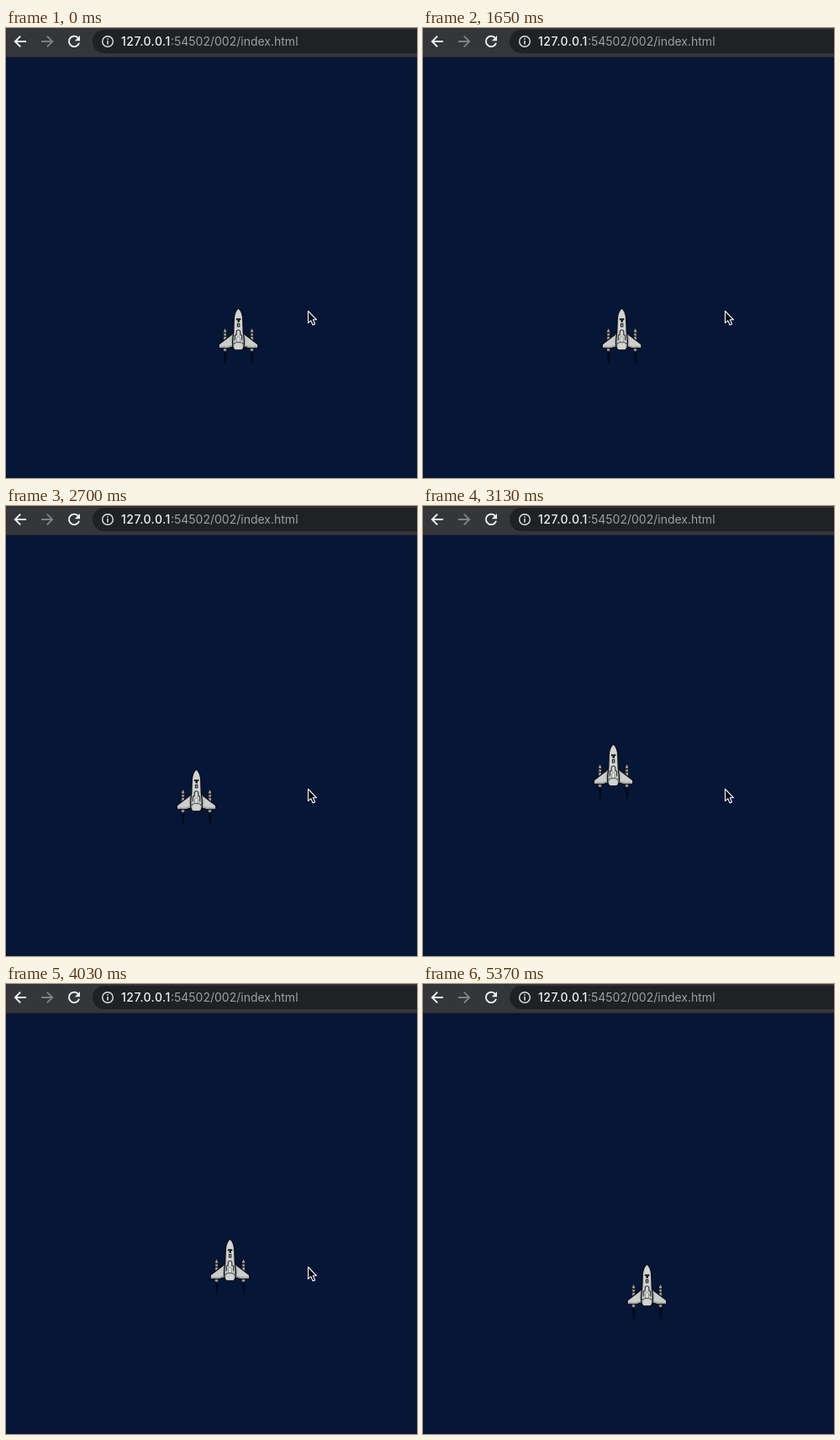
These frames come from a looping animation (489 by 535 pixels, 5.67 s). An HTML page:

```html
<!DOCTYPE html>
<html lang="en">
<head>
<meta charset="utf-8">
<title>Ship</title>
<style>
  html, body { margin: 0; width: 100%; height: 100%; overflow: hidden; background: #051637; }
  svg { display: block; width: 489px; height: 535px; }
  text { font: 14px Inter, Roboto, sans-serif; white-space: pre; }
  .host { font-weight: 500; letter-spacing: .48px; }
</style>
</head>
<body>
<svg viewBox="0 0 489 535" xmlns="http://www.w3.org/2000/svg">
  <defs>
    <linearGradient id="hull">
      <stop offset="0" stop-color="#a9abaa"/>
      <stop offset=".25" stop-color="#d2d4d2"/>
      <stop offset=".75" stop-color="#d2d4d2"/>
      <stop offset="1" stop-color="#a9abaa"/>
    </linearGradient>
    <g id="booster">
      <path d="M8.6 24.5 L10.4 28 V48 L10.8 50.5 L9.8 52.4 H7.4 L6.2 50.5 L6.8 48 V28 Z" fill="#a3a49f" stroke="#0d1014" stroke-width=".9"/>
      <path d="M6.6 30.5 H10.6 M6.6 34.4 H10.6" stroke="#15161a" stroke-width="1.4"/>
      <path d="M7.2 28.4 H10" stroke="#b49a83" stroke-width="1"/>
      <path d="M6.9 54 H10.4 L10 61 L9.2 67.5 L8.2 66 L7.8 60 Z" fill="#020814"/>
    </g>
    <g id="wing">
      <path d="M19.4 27 L16.6 32.4 L1.7 43.8 Q.4 46.8 1.8 48.6 L12 48.8 L19 46.6 Z" fill="#cccecc" stroke="#0b0e13" stroke-width="1.3" stroke-linejoin="round"/>
      <path d="M2.8 47 L11.8 47.2 L17.5 45" fill="none" stroke="#8a8d8d" stroke-width="1"/>
      <path d="M17.6 33 L15.8 39.5 L16.8 44.4" fill="none" stroke="#999c9c" stroke-width=".9"/>
    </g>
  </defs>

  <rect width="489" height="535" fill="#051637"/>

  <rect width="489" height="35" fill="#24262d"/>
  <rect width="489" height="34" fill="#35363a"/>
  <rect x="103" y="2" width="420" height="28" rx="14" fill="#202124"/>
  <g fill="none" stroke="#f1f3f4" stroke-width="1.9">
    <path d="M24 16 H11.5 M17.2 9.6 L10.8 16 L17.2 22.4"/>
    <path d="M42 16 H54.5 M48.8 9.6 L55.2 16 L48.8 22.4" stroke="#808185"/>
    <path d="M85.6 11.6 A6.2 6.2 0 1 0 87 17.8"/>
    <path d="M88 9 V15.2 H81.8 Z" fill="#f1f3f4" stroke="none"/>
    <circle cx="121" cy="16" r="6.3" stroke="#e4e5e8" stroke-width="1.4"/>
    <path d="M121 15 V19.4 M121 12.2 V13.8" stroke="#e4e5e8" stroke-width="1.5"/>
  </g>
  <text x="137" y="21" fill="#9aa0a6"><tspan class="host" fill="#f1f3f4">127.0.0.1</tspan>:54502/002/index.html</text>

  <g id="ship">
    <use href="#booster"/>
    <use href="#booster" x="32"/>
    <use href="#wing"/>
    <use href="#wing" transform="matrix(-1 0 0 1 49 0)"/>
    <path d="M24.5 1 C21.6 3.4 19.4 8.5 19.2 15 L18.8 28 L17.6 40 L17.8 46 Q18.4 51 22 51 H27 Q30.6 51 31.2 46 L31.4 40 L30.2 28 L29.8 15 C29.6 8.5 27.4 3.4 24.5 1 Z" fill="url(#hull)" stroke="#0b0e13" stroke-width="1.3"/>
    <path d="M21.8 13.2 H27.4 V15.2 H26 V17.8 H23.4 V15.2 H21.8 Z" fill="#191b1e"/>
    <rect x="23.4" y="19.6" width="2.4" height="3.4" fill="#b9bbba" stroke="#222427" stroke-width="1.1"/>
    <path d="M20.4 39.5 V33 H22.2 V29.4 Q22.4 27 24.5 27 Q26.6 27 26.8 29.4 V33 H28.6 V39.5" fill="none" stroke="#35383a" stroke-width="1.2"/>
    <path d="M22.8 41.6 L22.4 36.4 Q24.5 33 26.6 36.4 L26.2 41.6" fill="#dcdedc" stroke="#777a7a" stroke-width=".8"/>
    <path d="M19 44 Q19.8 41.6 22.6 41.8 H26.4 Q29.2 41.6 30 44" fill="none" stroke="#44474a" stroke-width="1.1"/>
  </g>

  <path id="cursor" d="M0 0 V14.2 L3.2 11.3 L5.6 16.6 L8.1 15.5 L5.8 10.3 H10 Z" fill="#05070c" stroke="#fff" stroke-width="1.1" stroke-linejoin="round"/>
</svg>
<script>
  const LOOP = 5670;
  const STEP = 10;
  const ship = document.getElementById('ship');
  const cursor = document.getElementById('cursor');

  // Each run: step direction, then the times of the key repeats.
  const runs = [
    { dx: -1, dy: 0, times: [300, 750, 1200, 1650, 2100] },
    { dx: 0, dy: -1, times: [2400, 2700, 2840, 2980, 3130] },
    { dx: 1, dy: 0, times: [3280, 3430, 3580, 3880] },
    { dx: 0, dy: 1, times: [3880, 4030, 4180, 4320, 4470] }
  ];

  // Pointer stops: time, x, y.
  const stops = [[0, 359.5, 336.5], [4920, 391.5, 371.5], [5070, 455.5, 472.5], [5220, 457.5, 514.5]];
  const POINTER_GONE = 5370;

  function place(el, x, y) {
    el.setAttribute('transform', `translate(${x} ${y})`);
  }

  function draw(t) {
    let x = 252, y = 332;
    for (const { dx, dy, times } of runs) {
      const count = times.filter(at => at <= t).length;
      x += dx * STEP * count;
      y += dy * STEP * count;
    }
    place(ship, x, y);

    const [, cx, cy] = stops.filter(([at]) => at <= t).pop();
    place(cursor, cx, cy);
    cursor.setAttribute('visibility', t < POINTER_GONE ? 'visible' : 'hidden');
  }

  const start = performance.now();
  function tick() {
    draw((performance.now() - start) % LOOP);
    requestAnimationFrame(tick);
  }
  draw(0);
  requestAnimationFrame(tick);
</script>
</body>
</html>
```
